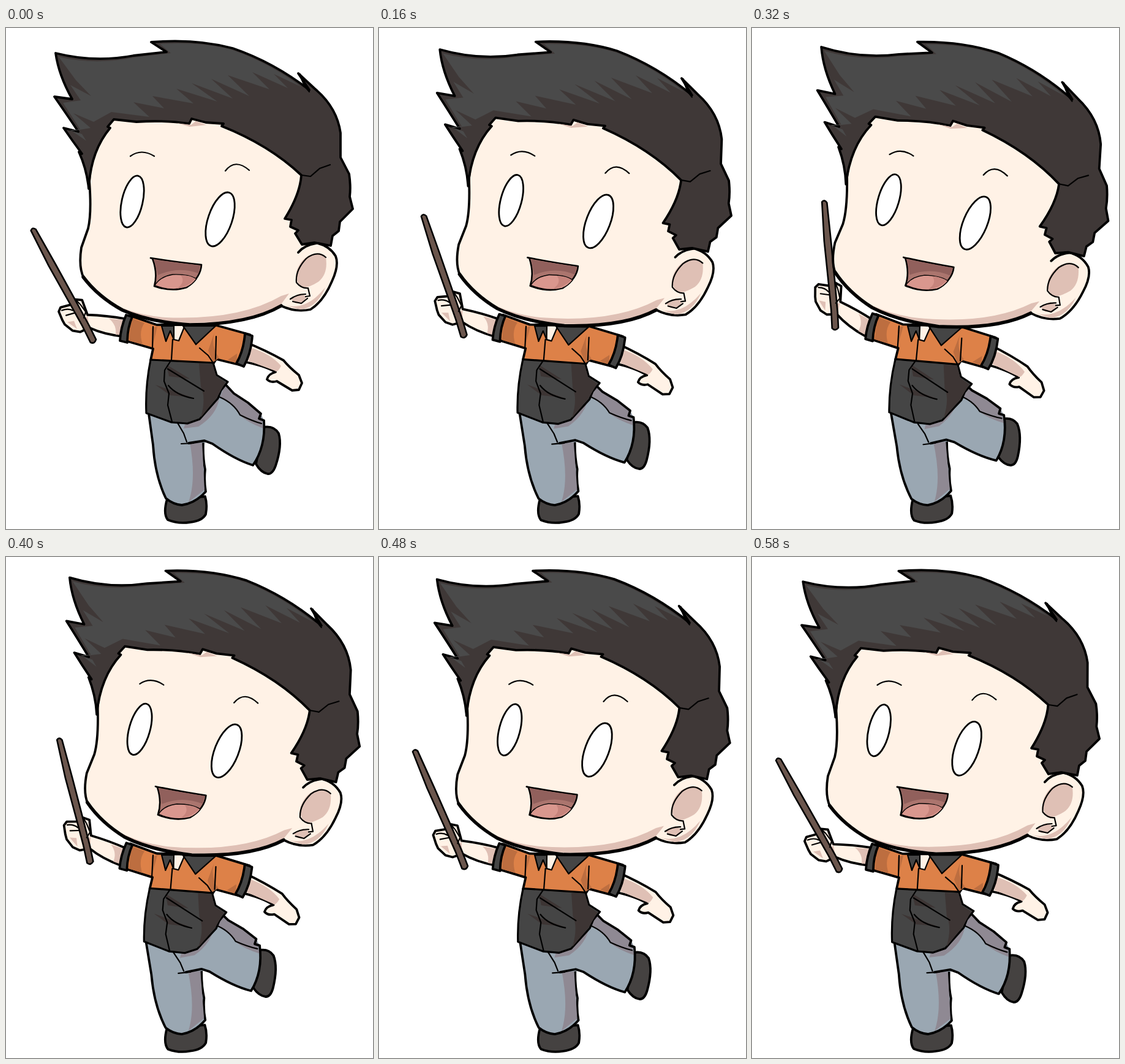
Animation of 599 by 817 pixels, one loop 0.6 s. Source, as an HTML page:

```html
<!DOCTYPE html>
<html lang="en">
<head>
<meta charset="utf-8">
<title>Waving conductor</title>
<style>
  html, body { margin: 0; width: 100%; height: 100%; overflow: hidden; background: #fff; }
  svg { display: block; width: 599px; height: 817px; }
  path, ellipse { stroke: #000; stroke-width: 3.8; stroke-linejoin: round; stroke-linecap: round; }
  .skin { fill: #fff2e6; }
  .blush { fill: #dfc0b5; stroke: none; }
  .hair { fill: #3f3837; }
  .gloss { fill: #4a4a4a; stroke: none; }
  .shoe { fill: #454241; }
  .orange { fill: #dd8148; }
  .rust { fill: #bd6e40; stroke: none; }
  .shirt { fill: #454545; }
  .fold { fill: #3d3534; stroke: none; }
  .jeans { fill: #9aa7b2; }
  .shade { fill: #8f8993; stroke: none; }
  .wand { fill: #6b564d; stroke-width: 2.6; }
  .line { fill: none; }
  .thin { stroke-width: 2.2; }
  .jaw { stroke-width: 5.5; }
  .eye { fill: #fff; stroke-width: 2.8; }
  .mouth { fill: #ab756e; stroke-width: 2.6; }
  .throat { fill: #91605c; stroke: none; }
  .tongue { fill: #d9978e; stroke-width: 1.4; }
  .tongueShade { fill: #c6847c; stroke: none; }
</style>
</head>
<body>
<svg viewBox="0 0 599 817">
  <g id="frontLeg">
    <path class="shoe" d="M263 768Q256 792 264 802Q281 809 300 806Q320 804 326 793Q329 777 325 764Z"/>
    <path class="jeans" d="M232 622L240 680Q243 730 261 767Q273 777 287 778Q309 775 326 756Q323 738 325 720Q321 700 322 675L340 640L300 622Z"/>
    <path class="shade" d="M300 676L320 674L324 753L298 773Q311 736 300 676Z"/>
  </g>

  <g id="backShoe">
    <path class="shoe" d="M420 651Q437 648 445 661Q451 681 440 714Q435 728 427 727Q416 725 408 711Z"/>
  </g>
  <g id="backLeg">
    <path class="jeans" stroke="none" style="stroke:none" d="M284 650L340 605L357 580L372 596L395 611L416 629L421 640Q424 683 403 713Q365 701 333 676L301 677Z"/>
    <path class="shade" d="M357 582L390 609L416 629L420 653Q396 644 382 632Q369 611 349 603ZM292 647L348 604Q344 631 314 650L290 653Z"/>
    <path class="line" d="M357 580L372 596L395 611L416 629L413 637L421 640Q424 683 403 713Q374 704 337 678L324 673L298 677"/>
    <path class="line thin" d="M280 644L290 661L295 675M286 678L306 677M349 602Q372 612 382 631Q402 641 417 645"/>
  </g>

  <g id="wandArm">
    <path class="skin" d="M194 474Q165 469 133 468L124 444L113 443L104 452L89 456L86 463L92 477L96 484L109 494L121 496L136 489Q160 500 192 503Z"/>
    <path class="blush" d="M192 476L168 474Q181 484 179 500L191 501ZM124 478L133 470L136 487L130 490ZM100 480L111 478L116 491Z"/>
    <path class="wand" d="M40 331Q42 325 48 329L80 385L114 446L136 486L147 508Q145 516 138 513L125 487L102 446L69 388Z"/>
    <path class="line thin" d="M91 461Q101 457 109 461M98 469L112 465M113 443L120 450M121 451L130 463L127 473"/>
  </g>

  <g id="torso">
    <g id="freeArm">
      <path class="skin" d="M390 512Q425 526 453 542Q462 553 478 566L483 579L478 590L467 591Q457 585 442 576Q432 579 426 573Q428 564 440 561Q420 550 386 544Z"/>
      <path class="blush" d="M398 521Q432 531 449 551Q443 563 439 559L396 543Z"/>
    </g>
    <path class="orange" d="M202 469L246 484L340 484L398 500L384 550L343 540L338 548L236 542L240 523L195 510Z"/>
    <path class="rust" d="M204 473L226 481Q216 495 223 516L201 510ZM238 489L247 487L239 520ZM340 497Q334 520 348 538L338 545L330 526ZM362 541L377 531L377 547Z"/>
    <path class="shirt" d="M196 468L206 471Q198 489 198 513L186 510Q187 489 196 468ZM390 498L402 502Q400 531 388 552L376 547Q388 526 390 498Z"/>
    <path class="shirt" d="M236 541L338 546L344 566L362 577L351 591L346 604L316 638L296 645L270 643L229 628Q227 586 236 541Z" style="stroke-width:3.2"/>
    <path class="fold" d="M315 547L337 548L343 568L358 578L344 603L318 635Q327 603 318 585ZM244 582L303 602L268 599ZM262 549L300 572L266 568Z"/>
    <path class="line thin" d="M272 508L270 541L259 558L258 576L266 596L264 615L271 642M264 556L323 592M265 583Q278 599 306 604M316 522L330 534L338 546M240 487L239 522M343 503L342 540"/>
    <path class="skin thin" d="M270 485L292 485L282 510L274 508Z"/>
    <path class="shirt thin" d="M254 486L261 511L268 494L274 508L274 486ZM289 486L310 516L342 486Z"/>
  </g>

  <g id="head">
    <path class="skin" d="M174 149Q138 190 136 250Q140 302 134 327L123 358Q118 390 127 408Q151 438 190 460Q232 479 300 484Q398 483 449 453Q472 464 497 459Q518 446 532 413Q544 387 538 372Q527 354 504 350L520 180L330 110Z"/>
    <path class="blush" d="M151 435Q195 467 260 472Q380 477 449 437L462 433L447 453Q398 481 300 481Q203 477 151 435ZM455 452Q490 462 521 423Q508 456 480 459Z"/>
    <path class="blush" d="M522 374Q526 400 511 413Q494 424 484 423Q472 416 474 397Q483 371 505 368Q518 366 522 374ZM464 441L480 433L491 438L484 449L472 449Z"/>
    <path class="line thin" d="M522 374Q508 362 490 376Q472 395 474 415Q482 425 493 424L496 437L489 438M464 442Q475 434 489 434M468 446L482 449L492 441"/>
    <path class="line" d="M477 366Q487 354 506 351"/>
    <path class="line jaw" d="M126 406Q150 438 190 460Q232 479 300 484Q398 483 449 453"/>
    <path class="hair" d="M81 41Q145 57 208 45L262 39L237 23Q310 17 370 33Q437 56 495 101L477 74L504 99Q540 129 546 171L546 211L560 238Q563 258 561 275L566 295L545 316L543 331L533 339L530 355L504 350L483 353L472 335L477 330L464 324L466 313L455 311Q480 271 482 240Q430 191 352 160L355 156L326 154L303 148L299 156Q260 150 213 153L176 149L166 161L170 163Q138 201 135 262Q132 231 119 202L124 205L108 183L94 163L118 169Q102 145 79 112L108 116Q86 77 81 41Z"/>
    <path class="gloss" d="M86 47Q145 61 210 48L269 41L251 26Q319 22 370 36Q430 57 482 96L437 75L460 98L402 72L430 100L362 77L397 111L335 83L370 115L303 90L345 120L278 99L306 123L239 111L258 131L208 121L234 145L172 137L143 153L110 139L138 163L108 168L131 184L124 173L104 167L121 165L93 122L122 118L105 93L139 111L114 85Z"/>
    <path class="line thin" d="M483 240L497 242L512 229L529 223M480 75Q484 93 495 104"/>
    <path class="blush" d="M278 155L302 158L310 152L327 158L300 161Z"/>
    <path class="line thin" d="M203 209Q221 196 242 209M358 233Q374 212 397 232"/>
    <ellipse class="eye" cx="206" cy="283" rx="17" ry="43" transform="rotate(13 206 283)"/>
    <ellipse class="eye" cx="349.500" cy="312" rx="19.500" ry="46" transform="rotate(19 349.500 312)"/>
    <path class="mouth" d="M236 375Q280 382 319 386Q318 407 295 423Q270 431 242 421Q248 400 239 376Z"/>
    <path class="throat" d="M242 378L317 387L314 400Q281 388 248 403Z"/>
    <path class="tongue" d="M243 420Q250 406 272 402Q298 401 311 409Q304 419 294 423Q270 430 243 420Z"/>
    <path class="tongueShade" d="M285 403Q302 403 309 409Q297 422 279 425Q294 414 285 403Z"/>
  </g>
</svg>
<script>
  const LOOP = 600, STEP = 20;
  const wandKeys = [[-60, -1.5], [100, 3.2], [300, 26], [540, -1.5], [700, 3.2]];

  function interpolate(keys, t) {
    const i = keys.findIndex(k => k[0] > t);
    const [t0, v0] = keys[i - 1], [t1, v1] = keys[i];
    return v0 + (v1 - v0) * (t - t0) / (t1 - t0);
  }

  function turn(id, angle, x, y) {
    document.getElementById(id).setAttribute('transform', `rotate(${angle} ${x} ${y})`);
  }

  function draw(now) {
    const t = Math.floor(now / STEP) * STEP % LOOP;
    const sway = 1 - Math.abs(t / (LOOP / 2) - 1);
    turn('head', 3.8 * sway, 259, 555);
    turn('torso', 2.2 * sway, 265, 485);
    turn('freeArm', 2.7 * sway, 375, 520);
    turn('frontLeg', -2.2 * sway, 290, 785);
    turn('backLeg', -4.6 * sway, 299, 766);
    turn('backShoe', -6.8 * sway, 299, 762);
    turn('wandArm', interpolate(wandKeys, t), 190, 484);
    requestAnimationFrame(draw);
  }

  draw(0);
</script>
</body>
</html>
```
